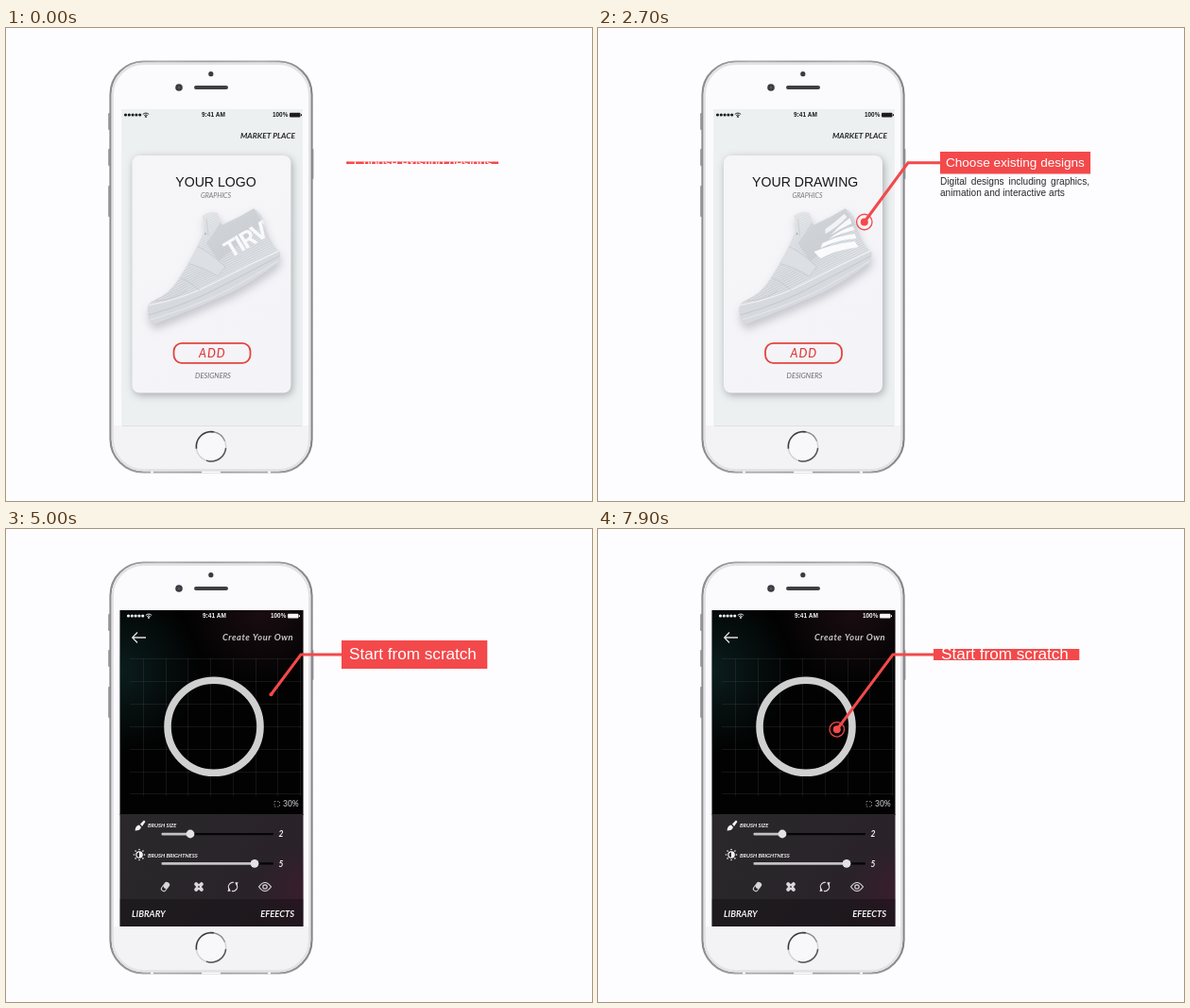
These frames come from a looping animation (620 by 501 pixels, 8 s). An HTML page with a canvas:

```html
<!DOCTYPE html>
<html lang="en">
<head>
<meta charset="utf-8">
<title>Shoe designer app</title>
<style>
html, body { margin: 0; width: 100%; height: 100%; overflow: hidden; background: #fdfcfe; }
canvas { display: block; width: 620px; height: 501px; }
</style>
</head>
<body>
<canvas id="stage" width="620" height="501"></canvas>
<script>
const ctx = document.getElementById('stage').getContext('2d');
const LOOP = 8000, CUT = 4900, SLIDE = 2310;
const RED = '#f3494b';
const SANS = '"Liberation Sans", Arial, sans-serif';
const GEO = 'Lato, "Open Sans", sans-serif';

const clamp = v => Math.max(0, Math.min(1, v));
const span = (t, from, len) => clamp((t - from) / len);
const ease = p => p * p * (3 - 2 * p);

function layer(draw) {
  ctx.save();
  draw();
  ctx.restore();
}

function text(str, x, y, font, color, align = 'left', spacing = 0) {
  ctx.font = font;
  ctx.fillStyle = color;
  ctx.textAlign = align;
  ctx.letterSpacing = spacing + 'px';
  ctx.fillText(str, x, y);
  ctx.letterSpacing = '0px';
}

function box(x, y, w, h, r, fill, stroke, width = 1) {
  ctx.beginPath();
  ctx.roundRect(x, y, w, h, r);
  if (fill) { ctx.fillStyle = fill; ctx.fill(); }
  if (stroke) { ctx.strokeStyle = stroke; ctx.lineWidth = width; ctx.stroke(); }
}

function disc(x, y, r, fill) {
  ctx.beginPath();
  ctx.arc(x, y, r, 0, 7);
  ctx.fillStyle = fill;
  ctx.fill();
}

function ring(x, y, r, color, width = 1, from = 0, to = 2 * Math.PI) {
  ctx.beginPath();
  ctx.arc(x, y, r, from, to);
  ctx.strokeStyle = color;
  ctx.lineWidth = width;
  ctx.stroke();
}

function path(d, fill, stroke, width = 1) {
  const p = new Path2D(d);
  if (fill) { ctx.fillStyle = fill; ctx.fill(p); }
  if (stroke) { ctx.strokeStyle = stroke; ctx.lineWidth = width; ctx.stroke(p); }
}

function gradient(x0, y0, x1, y1, ...colors) {
  const g = ctx.createLinearGradient(x0, y0, x1, y1);
  colors.forEach((c, i) => g.addColorStop(i / (colors.length - 1), c));
  return g;
}

function glow(x, y, r, rgb, alpha) {
  const g = ctx.createRadialGradient(x, y, 0, x, y, r);
  g.addColorStop(0, `rgba(${rgb},${alpha})`);
  g.addColorStop(1, `rgba(${rgb},0)`);
  ctx.fillStyle = g;
  ctx.fillRect(x - r, y - r, 2 * r, 2 * r);
}

function phone() {
  for (const [y, h] of [[90, 18], [128, 18], [167, 33]]) box(108, y, 3, h, 1, '#a5a6aa');
  box(322.5, 128, 3, 32, 1, '#a5a6aa');
  const edge = gradient(109, 0, 325, 0, '#8a8b8f', '#a9aaad', '#9c9da0', '#a9aaad', '#828387');
  box(110.5, 35.5, 213, 435, 35, '#fbfafc', edge, 2.2);
  box(113, 421, 208, 48, [0, 0, 33, 33], '#f3f2f5');
  box(112.8, 37.8, 208.4, 430.4, 33, null, '#e2e2e6', 2.2);
  ctx.fillStyle = '#fdfcfe';
  for (const x of [153, 207, 277]) ctx.fillRect(x, 469.5, x === 207 ? 20 : 3, 2);
  disc(216.8, 48.7, 2.6, '#3b3a3e');
  disc(183, 63, 3.8, '#3b3a40');
  disc(183, 63, 1.5, '#55525e');
  box(199, 61, 36, 4, 2, '#403e42');
  disc(217, 443.3, 16, '#f8f7fa');
  ring(217, 443.3, 15.7, '#d4d4d8', 1.5);
  ring(217, 443.3, 15.7, '#3c3d41', 1.6, 3.0, 4.9);
  ring(217, 443.3, 15.7, '#55565a', 1.5, 0.1, 1.9);
  ring(217, 443.3, 15.7, '#8a8b8f', 1.2, 4.9, 5.9);
}

function statusBar(color, left, mid, right) {
  for (let i = 0; i < 5; i++) disc(left + 1.5 + i * 3.8, 92, 1.6, color);
  const x = left + 23;
  disc(x, 94, 0.9, color);
  ring(x, 94.4, 2.4, color, 1, -2.4, -0.75);
  ring(x, 94.4, 4.3, color, 1, -2.4, -0.75);
  text('9:41 AM', mid, 94.3, `bold 6.5px ${SANS}`, color);
  text('100%', right, 94.3, `bold 6.4px ${SANS}`, color);
  box(right + 18, 89.8, 11.5, 4.8, 1, color);
  ctx.fillStyle = color;
  ctx.fillRect(right + 30, 91.3, 1, 1.8);
}

const SHOE = 'M208 199 Q216 193 224 196 L229 208 Q246 201 262 191 Q272 197 273 208 Q277 222 285 233 L290 238 ' +
  'Q290 244 287 249 Q262 268 238 280 Q195 299 158 313 Q151 312 150 300 Q149 291 158 288 ' +
  'Q174 281 184 264 Q199 241 211 213 Z';

function shoe(drawn) {
  layer(() => {
    ctx.shadowColor = 'rgba(110,112,122,.34)';
    ctx.shadowBlur = 9;
    ctx.shadowOffsetX = 1;
    ctx.shadowOffsetY = 6;
    path(SHOE, '#d8dbdf');
  });
  layer(() => {
    ctx.clip(new Path2D(SHOE));
    ctx.fillStyle = gradient(190, 210, 250, 290, '#dee0e3', '#cdd1d5', '#d9dce0');
    ctx.fillRect(140, 185, 160, 140);
    // knit texture
    ctx.strokeStyle = 'rgba(243,245,248,.6)';
    ctx.lineWidth = 0.8;
    ctx.beginPath();
    for (let y = 190; y < 400; y += 2.6) {
      ctx.moveTo(145, y);
      ctx.lineTo(295, y - 78);
    }
    ctx.stroke();
    path('M226 207 Q219 219 212 228 L225 247 L272 208 L262 191 Z', 'rgba(196,200,205,.5)');
    path('M196 229 Q211 233 232 253 L224 263 Q207 252 190 249 Z', '#dcdfe3', '#c3c7cc', 0.7);
    path('M149 293 Q190 286 226 266 Q258 249 291 234 L292 252 Q240 288 155 316 Z', '#d6d9de');
    path('M149 294 Q190 287 226 267 Q258 250 291 235', null, '#eff0f3', 1.3);
    path('M151 304 Q194 292 229 273 Q262 256 290 241', null, '#bfc3c8', 0.8);
    path('M153 309 Q200 295 234 278 Q264 262 289 246', null, '#e6e8eb', 1);
    path('M158 289 Q176 289 191 278 M185 265 Q194 268 205 278', null, '#c6cacf', 0.8);
    if (drawn) {
      path('M229 237 Q247 229 272 226 L276 232 Q252 235 236 244 Z', '#fbfbfd');
      path('M238 228 Q254 220 272 218 L274 223 Q254 224 236 233 Z', '#fbfbfd');
      path('M247 219 Q256 209 267 201 L269 207 Q258 212 247 219 Z', '#f8f9fb');
      path('M244 224 Q258 213 270 210 L272 214 Q258 217 244 224 Z', '#fbfbfd');
      path('M241 213 Q251 206 261 197 L264 200 Q254 211 241 218 Z', '#f1f3f5');
    } else {
      ctx.translate(238, 244);
      ctx.rotate(-0.54);
      text('TIRVU', -1, 0, `bold 25px Roboto, ${SANS}`, '#f9f9fb', 'left', -1.8);
    }
  });
  path('M208 199 Q216 193 224 196 L229 208 Q246 201 262 191', null, '#e8eaec', 1);
  path('M212 202 L214 220', null, '#c4c8cc', 0.7);
  disc(211, 218, 0.8, '#8d9196');
}

function card(dx, title, drawn) {
  layer(() => {
    ctx.translate(dx, 0);
    layer(() => {
      ctx.shadowColor = 'rgba(95,97,105,.5)';
      ctx.shadowBlur = 9;
      ctx.shadowOffsetX = 1.5;
      ctx.shadowOffsetY = 2.5;
      box(133.5, 135, 168, 251.5, 8, gradient(133, 135, 301, 387, '#f6f5f8', '#f4f3f7'));
    });
    shoe(drawn);
    text(title, drawn ? 219.7 : 222, 168, `14.1px ${SANS}`, '#171619', 'center');
    text('GRAPHICS', 222, 180, `italic 7px ${GEO}`, '#77777b', 'center');
    box(177.5, 333.8, 81, 21, 8.5, null, '#e0453f', 1.8);
    text('ADD', 204, 349, `italic 500 12.5px ${GEO}`, '#df3a3a', 'left', 1);
    text('DESIGNERS', 219, 370.5, `italic 7.5px ${GEO}`, '#6c6c70', 'center');
  });
}

function market(t) {
  ctx.fillStyle = '#edf0f1';
  ctx.fillRect(122, 86, 192, 335);
  ctx.fillStyle = '#dfe0e2';
  ctx.fillRect(123, 421, 190, 1);
  statusBar('#1c1b1e', 125, 207, 282);
  text('MARKET PLACE', 306, 117, `italic bold 8.4px ${GEO}`, '#29282b', 'right');
  layer(() => {
    ctx.beginPath();
    ctx.rect(121, 120, 194, 298);
    ctx.clip();
    const p = ease(span(t, SLIDE, 340));
    if (p < 1) card(-196 * p, 'YOUR LOGO', false);
    if (p > 0) card(196 * (1 - p) - 0.5, 'YOUR DRAWING', true);
  });
}

function slider(y, knob, name, value) {
  text(name, 150, y - 6.8, `italic bold 5.8px ${GEO}`, '#f2f0f2');
  box(195, y - 1, 88, 2.2, 1, '#050505');
  box(164.5, y - 1.2, knob - 164.5, 2.6, 1, '#c4c2c4');
  disc(knob, y, 4.4, '#e4e3e4');
  text(value, 291, y + 3.2, `italic bold 8.5px ${GEO}`, '#f4f2f4', 'center');
}

function icons() {
  const ink = '#d9d7d9', bright = '#f4f2f4';
  path('M136.5 319.5 Q137 314 141 313.5 L143 316 Q142 319.5 136.5 319.5 Z M142 312.5 L146 308.5 L147.5 310 L144 315 Z', bright);
  ring(141, 345, 3.2, bright, 1.2);
  ctx.beginPath();
  ctx.arc(141, 345, 3.2, -1.57, 1.57);
  ctx.fillStyle = bright;
  ctx.fill();
  for (let i = 0; i < 8; i++) {
    const a = i * Math.PI / 4;
    disc(141 + 5.5 * Math.cos(a), 345 + 5.5 * Math.sin(a), 0.8, bright);
  }
  layer(() => {
    ctx.translate(168.5, 379);
    ctx.rotate(0.65);
    box(-2.5, -5, 5, 10, 2.2, null, ink, 1);
    box(-2.5, -5, 5, 6.5, 2.2, ink);
  });
  layer(() => {
    ctx.translate(204, 379);
    for (const a of [0.78, -0.78]) {
      ctx.rotate(a);
      box(-6, -2, 12, 4, 2, ink);
      ctx.rotate(-a);
    }
    disc(0, 0, 0.9, '#3a343a');
  });
  ring(240, 379, 4.6, ink, 1.3, -0.7, 1.8);
  ring(240, 379, 4.6, ink, 1.3, 2.4, 4.9);
  path('M242 374.5 L245.5 374 L244.5 378 Z M238 383.5 L234.5 384 L235.5 380 Z', ink);
  path('M267.5 379 Q274 370 280.5 379 Q274 388 267.5 379 Z', null, ink, 1.2);
  ring(274, 379, 2.2, ink, 1.2);
}

function studio() {
  layer(() => {
    ctx.beginPath();
    ctx.rect(120.5, 86, 194, 335);
    ctx.clip();
    ctx.fillStyle = '#020202';
    ctx.fillRect(120, 86, 195, 217);
    glow(120, 150, 85, '22,62,62', 0.45);
    glow(270, 86, 80, '62,30,42', 0.4);
    ctx.fillStyle = gradient(120, 302, 315, 421, '#2a282b', '#29252a', '#2a2027');
    ctx.fillRect(120, 302, 195, 120);
    glow(316, 385, 55, '82,22,58', 0.35);
    ctx.fillStyle = 'rgba(10,8,10,.35)';
    ctx.fillRect(120, 392, 195, 30);

    ctx.fillStyle = 'rgba(120,120,122,.16)';
    for (let i = 0; i < 8; i++) ctx.fillRect(Math.round(145 + i * 23.7), 137, 1, 146);
    for (let i = 0; i < 7; i++) ctx.fillRect(131, Math.round(137 + i * 23.9), 182, 1);
    ring(220, 209.3, 49, '#d0d0d0', 7.6);

    statusBar('#f4f4f4', 128, 208, 280);
    path('M148 115 H134 M139 109.5 L133.7 115 L139 120.5', null, '#dededf', 1.3);
    text('Create Your Own', 229, 118, `italic bold 9.3px ${GEO}`, '#c9c8ca', 'left', 0.55);
    ctx.setLineDash([1.5, 1.5]);
    box(284, 288.5, 5.5, 5.5, 0, null, '#8a8a8a', 0.9);
    ctx.setLineDash([]);
    text('30%', 293, 294, `bold 8.5px ${GEO}`, '#a5a5a6');

    slider(323, 195, 'BRUSH SIZE', '2');
    slider(354.3, 263, 'BRUSH BRIGHTNESS', '5');
    icons();
    text('LIBRARY', 133, 410.5, `italic bold 9.4px ${GEO}`, '#f4f2f4');
    text('EFEECTS', 305, 410.5, `italic bold 9.4px ${GEO}`, '#f4f2f4', 'right');
  });
}

const LABELS = [
  {
    start: -18, untype: 3840, fold: 4320,
    x: 362, y: 131, w: 159, h: 23.6, mid: 142.8,
    title: 'Choose existing designs', tx: 368, ty: 147, size: 13.56,
    lines: ['Digital designs including graphics,', 'animation and interactive arts'],
    ly: 165.6, step: 12, small: 10.1, justify: 158,
    route: [[362, 142.8], [328, 142.8], [281.8, 205.5]]
  },
  {
    start: 4799, untype: 7310, fold: 7792,
    x: 355, y: 118, w: 154.5, h: 30, mid: 133,
    title: 'Start from scratch', tx: 363, ty: 138, size: 17.1,
    lines: ['Draw your idea , or customize', 'existing graphics'],
    ly: 161.2, step: 15, small: 11.85, justify: 0,
    route: [[355, 133], [312, 133], [252.8, 212.3]]
  }
];

// Strokes the part of the route between fractions a and b.
function strokeRoute(pts, a, b) {
  const legs = pts.slice(1).map((p, i) => Math.hypot(p[0] - pts[i][0], p[1] - pts[i][1]));
  const total = legs[0] + legs[1];
  const at = f => {
    const d = f * total, i = d > legs[0] ? 1 : 0;
    const k = (d - i * legs[0]) / legs[i];
    return pts[i].map((v, j) => v + (pts[i + 1][j] - v) * k);
  };
  const bend = legs[0] / total;
  ctx.beginPath();
  ctx.moveTo(...at(a));
  if (a < bend && b > bend) ctx.lineTo(...pts[1]);
  ctx.lineTo(...at(b));
  ctx.strokeStyle = RED;
  ctx.lineWidth = 3;
  ctx.lineJoin = 'miter';
  ctx.stroke();
  if (b < 1) disc(...at(b), Math.min(2, 1 + b * 20), RED);
}

function describe(lab, shown) {
  const font = `${lab.small}px ${SANS}`;
  let left = shown * lab.lines.join('').length;
  lab.lines.forEach((line, i) => {
    const part = line.slice(0, Math.max(0, Math.round(left)));
    left -= line.length;
    if (!part) return;
    ctx.font = font;
    if (lab.justify && i === 0) {
      const gap = (lab.justify - ctx.measureText(line).width) / (line.split(' ').length - 1);
      ctx.wordSpacing = gap + 'px';
    }
    text(part, lab.x, lab.ly + i * lab.step, font, '#29282b');
    ctx.wordSpacing = '0px';
  });
}

function pulse(x, y, age) {
  if (age < 940) return;
  const phase = (age - 940) % 1450;
  for (const delay of [0, 420]) {
    const p = (phase - delay) / 620;
    if (p <= 0 || p >= 1) continue;
    layer(() => {
      ctx.globalAlpha = Math.min(1, (1 - p) * 5);
      ring(x, y, 4 + 8 * p, RED, 1.3);
    });
  }
}

function label(lab, t) {
  const age = t - lab.start;
  if (age <= 0) return;
  const open = span(age, 0, 180) * (1 - span(t, lab.fold, 180));
  const grow = ease(span(age, 0, 325));
  const trim = span(t, lab.fold + 180, 220);
  if (trim < 1) strokeRoute(lab.route, trim, grow);

  const [x, y] = lab.route[2];
  const size = span(age, 300, 100) * (1 - span(t, lab.fold + 400, 160));
  if (size > 0) {
    if (trim === 1) disc(x, y, 4.2, 'rgba(243,73,75,.2)');
    disc(x, y, 3.8 * size + 0.2, RED);
    if (t < lab.fold + 180) pulse(x, y, age);
  }

  const h = lab.h * open;
  if (h > 0.5) {
    layer(() => {
      ctx.beginPath();
      ctx.rect(lab.x, lab.mid - h / 2, lab.w, h);
      ctx.clip();
      ctx.fillStyle = RED;
      ctx.fillRect(lab.x, lab.y - 1, lab.w, lab.h + 2);
      text(lab.title, lab.tx, lab.ty, `${lab.size}px ${SANS}`, '#fff');
    });
  }
  const typed = span(age, 260, 620) * (1 - span(t, lab.untype, 470));
  if (typed > 0) describe(lab, typed);
}

function frame(now) {
  const t = now % LOOP;
  ctx.fillStyle = '#fdfcfe';
  ctx.fillRect(0, 0, 620, 501);
  phone();
  if (t < CUT) market(t); else studio();
  if (t < CUT) label(LABELS[0], t);
  label(LABELS[1], t);
}

let begin;
function tick(now) {
  begin ??= now;
  frame(now - begin);
  requestAnimationFrame(tick);
}
requestAnimationFrame(tick);
</script>
</body>
</html>
```
